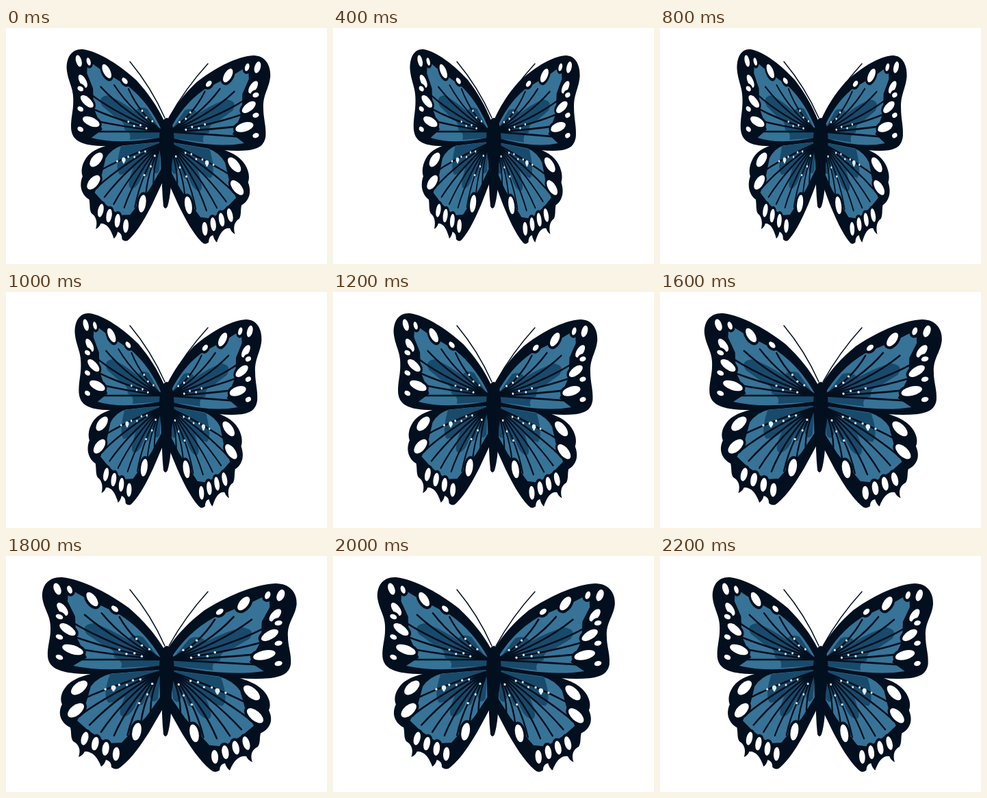
An HTML page with a canvas for the animation above (2400 ms loop, 469 by 344 pixels).

```html
<!DOCTYPE html>
<html lang="en">
<head>
<meta charset="utf-8">
<title>Butterfly</title>
<style>
html, body { margin: 0; width: 100%; height: 100%; overflow: hidden; background: #fff; }
canvas { display: block; }
</style>
</head>
<body>
<canvas width="469" height="344"></canvas>
<script>
const ctx = document.querySelector('canvas').getContext('2d');
const INK = '#020f1e', LIGHT = '#367397', DEEP = '#184a6b', DOT = '#e4f3fa';
const AXIS = 232, POSE_MS = 200, POSES = 12;

const front = {
  outline: 'M230 134C218 114 202 95 180 76C153 56 112 34 82 31C63 30 52 42 53 60C55 78 66 87 65 107C65 122 60 132 61 147C63 162 75 167 92 170Q140 177 230 162Z',
  light: 'M227 150Q204 110 167 86L114 60L91 47L90 66L101 88L102 116L118 148L98 160Q150 171 227 159Z',
  deep: 'M226 152L200 118Q185 112 178 122Q150 105 128 98Q108 100 118 114L145 132Q160 136 158 148Q172 152 168 163L226 160Z'
};
const hind = {
  outline: 'M229 160L145 168C118 172 98 178 88 190C78 202 80 212 82 216C74 232 82 244 94 250C96 258 94 264 98 270C106 274 110 282 106 293Q112 291 115 285Q130 284 139 307Q144 304 146 297Q154 299 154 308Q161 313 167 308C184 295 198 274 209 257L230 221Z',
  light: 'M224 166L155 171Q134 176 124 190L117 214L104 240L121 255L149 273L169 272L205 234L225 206Z',
  deep: 'M226 166L152 172Q140 205 150 214Q166 212 174 204Q160 234 172 234Q186 232 194 206Q190 222 200 216L208 196Q212 220 222 208Z'
};
for (const wing of [front, hind])
  for (const part in wing) wing[part] = new Path2D(wing[part]);

// Point at a distance from a wing root; positive angles point down and left.
function polar([x, y], deg, r) {
  const a = deg * Math.PI / 180;
  return [x - r * Math.cos(a), y + r * Math.sin(a)];
}

function line(path, width) {
  ctx.lineWidth = width;
  ctx.stroke(path);
}

function ellipse(x, y, length, width, deg) {
  const path = new Path2D();
  path.ellipse(x, y, length, width, deg * Math.PI / 180, 0, 7);
  return path;
}

function spot(...shape) {
  const path = ellipse(...shape);
  line(path, 8);
  ctx.fillStyle = '#fff';
  ctx.fill(path);
}

function dot([x, y], r = 1.7) {
  ctx.fillStyle = DOT;
  ctx.fill(ellipse(x, y, r, r, 0));
}

function dotRow(root, deg, far, near, count) {
  for (let i = 0; i < count; i++)
    dot(polar(root, deg + (i % 2) * 4, far + (near - far) * i / (count - 1)));
}

function vein(root, deg, r, bend) {
  const path = new Path2D();
  path.moveTo(...root);
  path.quadraticCurveTo(...polar(root, deg * bend, r * 0.55), ...polar(root, deg, r));
  line(path, 2.6);
}

function base(wing) {
  ctx.fillStyle = INK;
  ctx.fill(wing.outline);
  ctx.fillStyle = LIGHT;
  ctx.fill(wing.light);
  ctx.fillStyle = DEEP;
  ctx.fill(wing.deep);
}

function drawFront() {
  const root = [228, 151];
  base(front);
  for (let i = 0; i < 7; i++)
    vein(root, -45 + 7.5 * i, 88 + 57 * Math.sin(i * 0.42), 0.7);
  for (let i = 0; i < 4; i++) {
    const y = 48 + 29.5 * i;
    spot(75 + 7.5 * i, y, 9 + 2.3 * i, 5 + 0.5 * i, 68 - 17 * i);
    if (i) spot(78, y + 11, 5.5, 3.5, 20);
  }
  for (let i = 0; i < 3; i++) {
    const swell = i % 2;
    spot(93 + 33 * i, 49 + 14 * i, 6 + 6 * swell, 3.5 + 2.5 * swell, 68 - 14 * i);
  }
  dotRow(root, -13, 64, 30, 4);
  dotRow(root, -39, 48, 24, 3);
}

function drawHind() {
  const root = [226, 168];
  base(hind);
  for (let i = 0; i < 8; i++)
    vein(root, 20 + 8.5 * i, 135 - 1.2 * i * i, 0.8);
  for (let i = 0; i < 2; i++) spot(107 - 5 * i, 192 + 33 * i, 14, 7.5, -38);
  for (let i = 0; i < 4; i++) spot(115 + 15.3 * i, 266 + 7.5 * i, 10, 5, 106 - 4 * i);
  spot(191, 256, 13, 6.5, 102);
  dot([157, 192], 3.5);
  dotRow(root, 18, 85, 32, 6);
  dotRow(root, 56, 56, 22, 3);
}

// The right wings mirror the left ones, tilted slightly downwards.
function rightSide(draw, stretch, x) {
  ctx.save();
  ctx.transform(-stretch, -0.06, 0, 1, x, 13.8);
  draw();
  ctx.restore();
}

const antennae = new Path2D('M232 131Q212 86 181 49M238 131Q262 88 295 52');
const body = new Path2D('M228 137Q235 125 242 137Q249 160 242 200Q242 240 236 260Q233 266 230 260Q227 230 228 200Q220 160 228 137Z');
const start = performance.now();

// The wings fold and open again in held poses.
function draw() {
  const pose = (Math.floor((performance.now() - start) / POSE_MS) + 3) % POSES;
  const fold = Math.min(pose, POSES - pose);
  ctx.clearRect(0, 0, 469, 344);
  ctx.strokeStyle = INK;
  ctx.lineCap = 'round';
  ctx.save();
  ctx.translate(AXIS, 0);
  ctx.scale(1 - 0.0665 * fold, 1);
  ctx.translate(-AXIS, 0);
  drawHind();
  rightSide(drawHind, 1, 466);
  drawFront();
  rightSide(drawFront, 1.06, 480.8);
  ctx.restore();
  line(antennae, 1.5);
  ctx.fillStyle = INK;
  ctx.fill(body);
  requestAnimationFrame(draw);
}
draw();
</script>
</body>
</html>
```
